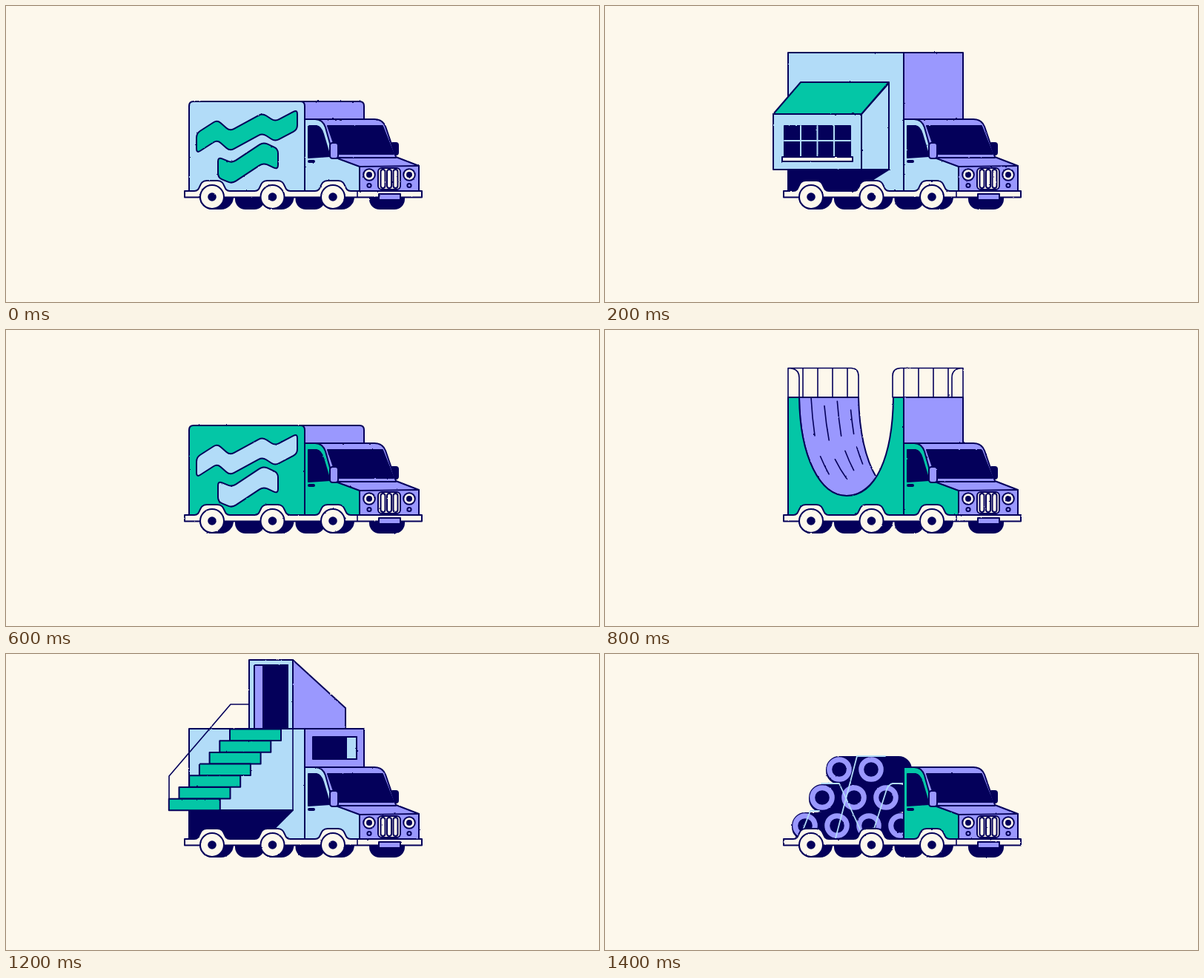
Write an HTML page that moves like this. It is 800x400 px and loops after 1600 ms.

```html
<!DOCTYPE html>
<html lang="en">
<head>
<meta charset="utf-8">
<title>Shape-shifting truck</title>
<style>
  html, body { margin: 0; width: 100%; height: 100%; overflow: hidden; background: #fdf8ec; }
  svg { display: block; width: 100%; height: 100%; }
</style>
</head>
<body>
<svg viewBox="0 0 800 400" xmlns="http://www.w3.org/2000/svg">
  <defs>
    <filter id="rough" filterUnits="userSpaceOnUse" x="0" y="0" width="800" height="400" color-interpolation-filters="sRGB">
      <feTurbulence id="noise" type="fractalNoise" baseFrequency="0.3" numOctaves="1" seed="1" result="n"/>
      <feDisplacementMap in="SourceGraphic" in2="n" scale="2" xChannelSelector="R" yChannelSelector="G"/>
    </filter>
  </defs>
  <g id="truck" filter="url(#rough)" stroke="#04005a" stroke-width="2" stroke-linejoin="round" stroke-linecap="round" fill="none"></g>
</svg>
<script>
const STEP = 200;
const NAVY = '#04005a', BLUE = '#b2dcf8', LILAC = '#9a98fe', GREEN = '#04c6a6', CREAM = '#fdf8ec';

// Truck landmarks
const LEFT = 247, MID = 403, RIGHT = 483, ROOF = 153, FLOOR = 250;

const loop = (n, draw) => Array.from({ length: n }, (_, i) => draw(i)).join('');
const path = (d, fill = 'none') => `<path d="${d}" fill="${fill}"/>`;
const poly = (pts, fill) => path(`M${pts}Z`, fill);
const line = (d, w = 1.6, color = NAVY) => `<path d="${d}" stroke="${color}" stroke-width="${w}"/>`;
const rect = (x, y, x2, y2, fill, r = 0) =>
  `<rect x="${x}" y="${y}" width="${x2 - x}" height="${y2 - y}" rx="${r}" fill="${fill}"/>`;
const disc = (x, y, r, fill) => `<circle cx="${x}" cy="${y}" r="${r}" fill="${fill}"/>`;
const ring = (x, y, r, hub) => disc(x, y, r, CREAM) + disc(x, y, hub, NAVY);
const bars = (n, x, gap, y, y2) => line(loop(n, i => `M${x + i * gap},${y}V${y2}`));

function random(seed) {
  return () => (seed = seed * 16807 % 2147483647) / 2147483647;
}

function bezier(p, t) {
  const s = 1 - t, w = [s * s * s, 3 * s * s * t, 3 * s * t * t, t * t * t];
  return [0, 1].map(axis => p.reduce((sum, q, i) => sum + q[axis] * w[i], 0));
}

const mix = (a, b, k) => a.map((v, i) => v + (b[i] - v) * k);

// Band of constant height below a zigzag, with rounded corners
function ribbon(top, height, fill, round = 6) {
  const p = [...top, ...top.map(([x, y]) => [x, y + height]).reverse()];
  const toward = (a, b) => mix(a, b, Math.min(round / Math.hypot(b[0] - a[0], b[1] - a[1]), 0.5));
  const d = p.map((c, i) => {
    const prev = p[(i + p.length - 1) % p.length], next = p[(i + 1) % p.length];
    return `${i ? 'L' : 'M'}${toward(c, prev)}Q${c} ${toward(c, next)}`;
  });
  return path(d.join('') + 'Z', fill);
}

const wheelX = i => 278 + i * 81.5;

function tyres() {
  return loop(2, i => rect(wheelX(i) + 32, 246, wheelX(i) + 70, 274, NAVY, 13)) +
    rect(491, 246, 537, 274, NAVY, 13) +
    loop(3, i => rect(wheelX(i) - 16, 242, wheelX(i) + 28, 274, NAVY, 16));
}

function skirt() {
  const arch = x => `H${x - 24}C${x - 14},250 ${x - 19},236 ${x - 7},236h14C${x + 19},236 ${x + 14},250 ${x + 24},250`;
  return path(`M241,250${loop(3, i => arch(wheelX(i)))}H561v8.5H241Z`, CREAM) +
    line('M474,250v8') +
    loop(3, i => ring(wheelX(i), 258, 16, 4.8)) +
    rect(503, 254, 532, 262, LILAC);
}

function cab(side) {
  const lamp = x => ring(x, 228, 7.8, 3) + disc(x, 242.5, 2.6, LILAC);
  return rect(519, 185, 529, 201, NAVY, 3) +
    path('M416,153H497Q508,153 512,163L526,204L557,216V250H476L430,205Z', LILAC) +
    path('M403,153H417Q427,153 431,164L442,204L477,217V250H403Z', side) +
    poly('434,162 508,162 523,200 447,200', NAVY) +
    path('M408,162H419Q425,163 428,173L437,203L408,205Z', NAVY) +
    line('M442,205H526M477,217L557,216M477,217V250', 1.8) +
    rect(437, 185, 448, 206, LILAC, 3.5) +
    rect(408, 209, 416, 211, NAVY, 1) +
    rect(502, 219, 532, 248, CREAM, 5) +
    loop(3, i => rect(505.5 + i * 8.5, 221, 511.5 + i * 8.5, 246, CREAM, 3)) +
    loop(2, i => lamp(490 + i * 54));
}

const box = (top, side = BLUE) =>
  rect(MID, top, RIGHT, ROOF, LILAC) + rect(LEFT, top, MID, FLOOR, side);

// Dark gap under a part that slides out of the box
const gap = (y, x, foot) => poly(`${LEFT},${y} ${x},${y} ${foot},238 ${foot},250 ${LEFT},250`, NAVY);

function van(side, waves) {
  return path('M394,129H477q6,0 6,6V153H394Z', LILAC) +
    path('M247,250V135q0,-6 6,-6H397q6,0 6,6V250Z', side) +
    ribbon([[257, 172], [285, 154], [302, 169], [346, 145], [363, 156], [393, 140]], 27, waves) +
    ribbon([[286, 204], [305, 212], [347, 184], [367, 193]], 28, waves);
}

function slideOut() {
  const panes = loop(3, i => `M${264 + i * 22.5},162V204`) + 'M242,182H331';
  return box(63) + gap(221, 383, 356) +
    poly('346,146 383,104 383,221 346,221', BLUE) +
    rect(227, 146, 346, 221, BLUE) +
    poly('227,146 264,103 383,103 346,146', GREEN) +
    rect(242, 162, 331, 205, NAVY) + line(panes, 2, BLUE) +
    rect(239, 204, 334, 210, CREAM);
}

function slope() {
  return line('M257,212V134q0,-11 11,-11H360') + bars(5, 274, 16.3, 123, 200) +
    poly('385,99 465,99 483,153 403,153', LILAC) +
    poly('247,218 385,99 403,153 403,250 247,250', GREEN) +
    ribbon([[357, 137], [384, 155]], 27, BLUE) +
    ribbon([[312, 182], [331, 169], [366, 201], [393, 190]], 26, BLUE, 9) +
    line('M407,151V135H490M491,142V153') +
    loop(4, i => ring(421 + i * 23, 135, 7.4, 2.6));
}

// Dashes that follow the bend of the ramp, lane by lane
function grain(left, right) {
  const rnd = random(11);
  return line(loop(4, lane => {
    let d = '';
    for (let t = rnd() * 0.15; t < 0.8; t += 0.14 + rnd() * 0.1) {
      const end = Math.min(t + 0.18 + rnd() * 0.18, 0.94);
      const at = k => mix(bezier(left, k), bezier(right, k), 0.2 + lane * 0.22);
      d += `M${at(t)}Q${at((t + end) / 2)} ${at(end)}`;
      t = end;
    }
    return d;
  }));
}

function halfPipe() {
  const left = [[262, 91], [263, 172], [290, 224], [326, 224]];
  const right = [[342, 91], [343, 132], [350, 172], [366, 199]];
  const curve = ([a, b, c, d]) => `${a}C${b} ${c} ${d}`;
  return rect(MID, 91, RIGHT, ROOF, LILAC) +
    path(`M${curve(left)}Q348,224 ${curve([...right].reverse())}Z`, LILAC) +
    grain(left, right) +
    path(`M247,91H${curve(left).replace(',', 'V')}C365,224 388,172 389,91H403V250H247Z`, GREEN) +
    line('M247,91V51.5H332q10,0 10,11V91ZM247,51.5q15,0 15,13V91') +
    line('M388,91V62.500q0,-11 11,-11H483V91ZM483,51.5q-15,0 -15,13V91') +
    bars(4, 267, 20, 52, 91) + bars(4, 403, 20, 52, 91);
}

function stairs() {
  const step = i => rect(302 - i * 13.7, 101.5 + i * 15.7, 371 - i * 13.7, 117 + i * 15.7, GREEN);
  return box(101) + gap(211, 387, 360) + line('M387,101V211') +
    rect(414, 112, 473, 142, NAVY) + rect(459, 112, 473, 142, BLUE) +
    poly('387,8 458,73 458,101 387,101', LILAC) +
    rect(328, 8, 387, 101, BLUE) + rect(335, 15, 347, 101, LILAC) + rect(347, 15, 380, 101, NAVY) +
    loop(7, step) + line('M220,196V165L303,68H328');
}

function logs() {
  const row = k => {
    const x = 316 - k * 23, y = 156 + k * 38;
    const end = i => `<circle cx="${x + i * 43}" cy="${y}" r="13.3" stroke="${LILAC}" stroke-width="7"/>`;
    return rect(x - 17, y - 17, 413, y + 19, NAVY, 17) + loop(k + 2, end);
  };
  const straps = 'M378,138H340L311,249M289,212H277L267,238M292,175H316L346,241M402,175H388q-5,1 -8,8L363,236';
  return loop(3, i => row(2 - i)) + line(straps, 1.8, BLUE);
}

const SCENES = [
  [van(BLUE, GREEN), BLUE],
  [slideOut(), BLUE],
  [slope(), GREEN],
  [van(GREEN, BLUE), GREEN],
  [halfPipe(), GREEN],
  [van(BLUE, LILAC), BLUE],
  [stairs(), BLUE],
  [logs(), GREEN]
].map(([load, side]) => tyres() + load + cab(side) + skirt());

const truck = document.getElementById('truck');
const noise = document.getElementById('noise');
const start = performance.now();
let shown = -1;

function draw(t) {
  const i = Math.floor(t / STEP) % SCENES.length;
  if (i === shown) return;
  shown = i;
  truck.innerHTML = SCENES[i];
  noise.setAttribute('seed', i + 1);
}

function tick() {
  draw(performance.now() - start);
  requestAnimationFrame(tick);
}
tick();
</script>
</body>
</html>
```
